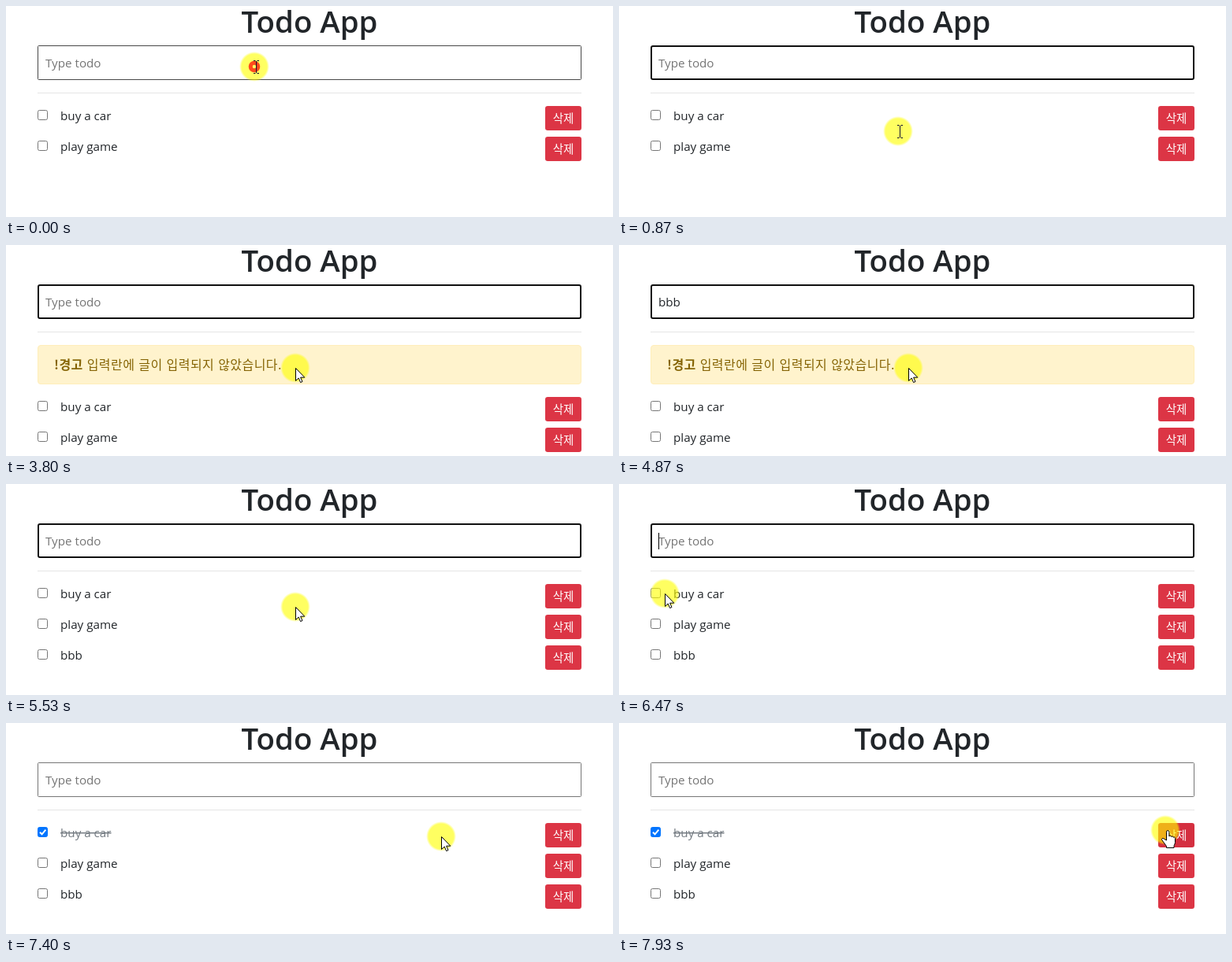
These frames come from a looping animation (770 px wide and 268 px high, 8 s). An HTML page:

```html
<!DOCTYPE html>
<html lang="ko">
<head>
<meta charset="utf-8">
<title>Todo App</title>
<style>
  html, body { margin: 0; width: 100%; height: 100%; overflow: hidden; background: #fff; }
  svg { display: block; width: 770px; height: 268px; }
  text { font: 15.2px "Open Sans", "Noto Sans CJK KR", "Noto Sans CJK", sans-serif; fill: #212529; white-space: pre; }
  .title { font-size: 38.4px; font-weight: 600; text-anchor: middle; }
  .hint { fill: #757575; }
  .ko { font: 16px "Noto Sans CJK KR", "Noto Sans CJK", sans-serif; letter-spacing: .45px; fill: #856404; }
  .ko tspan { font-weight: 700; }
  .btn { font: 14.5px "Noto Sans CJK KR", "Noto Sans CJK", sans-serif; fill: #fff; text-anchor: middle; }
  .done { fill: #747b82; text-decoration: line-through; }
</style>
</head>
<body>
<svg viewBox="0 0 770 268">
  <defs>
    <radialGradient id="glow">
      <stop offset=".84" stop-color="#ff0" stop-opacity=".62"/>
      <stop offset="1" stop-color="#ff0" stop-opacity="0"/>
    </radialGradient>
  </defs>
  <text class="title" x="385" y="34">Todo App</text>
  <rect id="field" fill="#fff"/>
  <text id="hint" class="hint" x="50" y="78">Type todo</text>
  <text id="typed" x="50" y="78"></text>
  <rect id="caret" y="62" width="1" height="21"/>
  <rect x="40" y="110" width="690" height="1" fill="#e5e5e5"/>
  <g id="alert">
    <rect x="40.5" y="127.5" width="689" height="49" rx="3.5" fill="#fff3cd" stroke="#ffeeba"/>
    <text class="ko" x="61" y="158"><tspan>!경고</tspan> 입력란에 글이 입력되지 않았습니다.</text>
  </g>
  <g id="list"></g>
  <circle id="halo" r="19" fill="url(#glow)"/>
  <circle id="ripple" fill="none" stroke="#ff4a1c" stroke-width="5"/>
  <g id="pointer">
    <path id="beam" d="M-1 -7.5H1.5M3.5 -7.5H6M2.5 -7V8M-1 8.5H1.5M3.5 8.5H6" fill="none" stroke="#101030"/>
    <path id="arrow" d="M.5 .5V16.5L4.2 13 6.6 18.6 9 17.5 6.6 12.2H11.8Z" fill="#fff" stroke="#000"/>
    <path id="hand" d="M1.5 13V2.3a1.7 1.7 0 0 1 3.4 0V8a1.5 1.5 0 0 1 2.8 .5a1.5 1.5 0 0 1 2.6 .8a1.3 1.3 0 0 1 2.2 1V15.5c0 2-1.5 3.5-1.5 5V22.5H1.5V20.5L-4.3 12.5c-.8-1.5 1-2.8 2.5-1.5z" fill="#fff" stroke="#000"/>
  </g>
</svg>
<script>
const $ = id => document.getElementById(id);
const set = (el, attrs) => { for (const a in attrs) el.setAttribute(a, attrs[a]); };
const show = (el, on) => el.style.display = on ? '' : 'none';

$('list').innerHTML = ['buy a car', 'play game', 'bbb'].map((label, i) => `
  <g transform="translate(0 ${i * 39})">
    <rect class="box" x="40.5" y="132.5" width="12" height="12" rx="2" fill="#fff" stroke="#767676"/>
    <path class="tick" d="M43 138.7L45.6 141.3 50.3 135.6" fill="none" stroke="#fff" stroke-width="2"/>
    <text class="label" x="69" y="145">${label}</text>
    <rect class="del" x="684" y="127" width="46" height="31" rx="3.2" fill="#dc3545"/>
    <text class="btn" x="707" y="147.5">삭제</text>
  </g>`).join('');
const rows = [...$('list').children];
rows.forEach((row, i) => i && show(row.querySelector('.tick'), false));
const part = name => rows[0].querySelector(name);

// Times are ticks of 1/15 s.
const LOOP = 8000;
const CARET = [[1, 10], [18, 26], [34, 41], [50, 57], [60, 73], [75, 83], [91, 99]];
const CLICKS = [[-1.2, 315, 77], [100.2, 46, 140]];
const inOut = u => u * u * (3 - 2 * u), linear = u => u, out = u => u * (1.35 - .35 * u);
// tick, x, y, easing towards this point
const PATH = [
  [0, 315, 77], [2, 315, 77, linear], [13, 354, 159, inOut],
  [39, 354, 159, linear], [41, 367, 156, linear],
  [86, 367, 156, linear], [97, 58, 139, inOut], [101, 46, 140, out],
  [103, 46, 140, linear], [111, 552, 144, inOut], [119, 693, 136, out], [120, 693, 136, linear]
];

function mouseAt(k) {
  const i = Math.max(1, PATH.findIndex(p => p[0] >= k));
  const [t0, x0, y0] = PATH[i - 1], [t1, x1, y1, ease] = PATH[i];
  const u = ease((k - t0) / (t1 - t0));
  return [x0 + (x1 - x0) * u, y0 + (y1 - y0) * u].map(Math.round);
}

function draw(ms) {
  const k = Math.min(119, Math.floor(ms * .015 + .06));
  const within = (a, b) => k >= a && k < b;

  const focus = within(1, 101);
  const w = focus ? 2 : 1;
  set($('field'), {
    x: 40 + w / 2, y: 50 + w / 2, width: 690 - w, height: 44 - w, rx: focus ? 2 : 1,
    'stroke-width': w, stroke: focus ? '#101010' : k < 1 ? '#484848' : '#767676'
  });
  const n = !within(60, 75) ? 0 : k < 63 ? 1 : k < 65 ? 2 : 3;
  $('typed').textContent = 'b'.repeat(n);
  show($('hint'), !n);
  set($('caret'), { x: Math.round(50 + n * 9.3) });
  show($('caret'), CARET.some(c => within(...c)));

  const warn = within(14, 75);
  show($('alert'), warn);
  set($('list'), { transform: `translate(0 ${warn ? 66 : 0})` });
  show(rows[2], k >= 75);

  const done = k >= 102;
  set(part('.box'), { fill: done ? '#0075ff' : '#fff', stroke: done ? '#0075ff' : '#767676' });
  show(part('.tick'), done);
  part('.label').classList.toggle('done', done);

  const [x, y] = mouseAt(k);
  const hover = x >= 684;
  set(part('.del'), { fill: hover ? '#d42f40' : '#dc3545' });
  set($('halo'), { cx: x, cy: y });
  set($('pointer'), { transform: `translate(${x} ${y})` });
  show($('beam'), k < 41);
  show($('arrow'), k >= 41 && !hover);
  show($('hand'), hover);

  const click = CLICKS.find(([t]) => k >= t && k < t + 6);
  show($('ripple'), click);
  if (click) {
    const age = k - click[0];
    set($('ripple'), { cx: click[1], cy: click[2], r: age * 4, opacity: Math.min(1, 1.2 - age / 6) });
  }
}

function loop(now) {
  draw(now % LOOP);
  requestAnimationFrame(loop);
}
draw(0);
requestAnimationFrame(loop);
</script>
</body>
</html>
```
